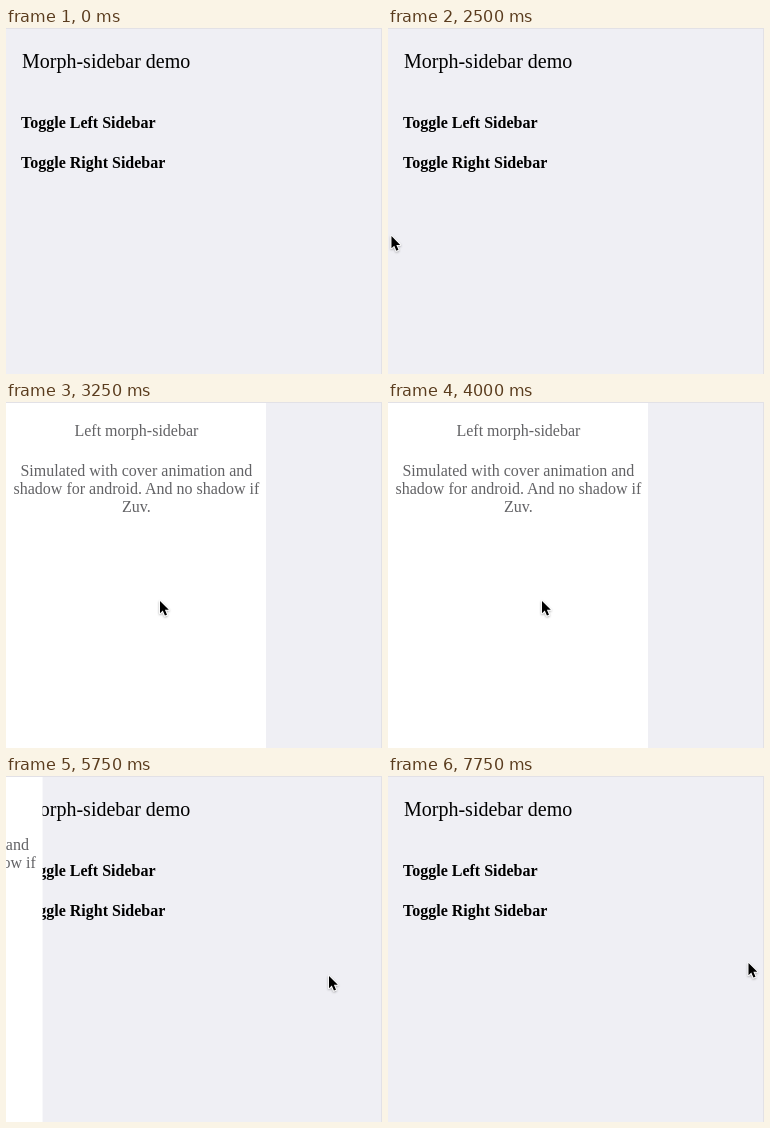
These frames come from a looping animation (376 by 346 pixels, 8000 ms). An HTML page:

```html
<!DOCTYPE html>
<html lang="en">
<head>
<meta charset="utf-8">
<title>Morph-sidebar demo</title>
<style>
  html, body { margin: 0; width: 100%; height: 100%; overflow: hidden; background: #efeff4; }
  svg { display: block; width: 376px; height: 346px; font: 16px "Liberation Serif", serif; }
  .title { font-size: 20px; }
  .link { font-weight: bold; }
  .panel text { fill: #626265; text-anchor: middle; }
</style>
</head>
<body>
<svg viewBox="0 0 376 346">
  <defs>
    <filter id="shadow" x="-50%" y="-50%" width="200%" height="200%">
      <feDropShadow dx="0" dy="1" stdDeviation=".8" flood-opacity=".35"/>
    </filter>
  </defs>
  <rect width="376" height="346" fill="#efeff4"/>
  <text class="title" x="16" y="40">Morph-sidebar demo</text>
  <text class="link" x="15" y="100">Toggle Left Sidebar</text>
  <text class="link" x="15" y="140">Toggle Right Sidebar</text>
  <g class="panel" id="panel">
    <rect width="260" height="346" fill="#fff"/>
    <text x="130.4" y="34">Left morph-sidebar</text>
    <text x="130.4" y="74">Simulated with cover animation and</text>
    <text x="130.4" y="92">shadow for android. And no shadow if</text>
    <text x="130.4" y="110">Zuv.</text>
  </g>
  <path d="M0 .5H376M375.5 0V346" stroke="#e2e1e6" fill="none"/>
  <g id="cursor" filter="url(#shadow)">
    <path d="M1 1V13.2L3.8 10.6L5.9 15.6L8 14.7L5.9 9.8H9.8Z"
      stroke="#fff" stroke-width="1.6" stroke-linejoin="round" paint-order="stroke"/>
  </g>
</svg>
<script>
  const LOOP = 8000, STEP = 250, WIDTH = 260;
  const panel = document.getElementById('panel');
  const cursor = document.getElementById('cursor');

  const linear = p => p;
  const easeIn = p => p ** 3;
  const easeOut = p => 1 - (1 - p) ** 2;
  const smooth = p => p * p * (3 - 2 * p);
  const ramp = (t, from, to) => Math.min(1, Math.max(0, (t - from) / (to - from)));

  // Each move continues from the previous end; sag bends its path downwards.
  const start = { x: 81, y: 169 };
  const moves = [
    { from: 250, to: 750, x: 59, y: 219, ease: easeIn },
    { from: 1250, to: 1500, x: 25.5, y: 209 },
    { from: 1500, to: 2750, x: 1.5, y: 207, ease: easeOut },
    { from: 2750, to: 3000, x: 117, y: 209.5 },
    { from: 3000, to: 3250, x: 153, y: 198 },
    { from: 4000, to: 4750, x: 322, y: 199, ease: smooth, sag: 9 },
    { from: 6000, to: 6750, x: 362, y: 183, sag: -5 },
    { from: 6750, to: 7000, x: 359.5, y: 186 }
  ];

  function pointerAt(t) {
    let { x, y } = start;
    for (const { from, to, x: toX, y: toY, ease = linear, sag = 0 } of moves) {
      const p = ramp(t, from, to);
      const k = ease(p);
      x += (toX - x) * k;
      y += (toY - y) * k + sag * Math.sin(Math.PI * p);
    }
    return [x, y];
  }

  function panelEdge(t) {
    const opened = ramp(t, 2750, 3250) ** 1.19;
    const kept = (1 - ramp(t, 5500, 6000)) ** 2.83;
    return WIDTH * opened * kept;
  }

  const move = (node, x, y) => node.setAttribute('transform', `translate(${x} ${y})`);

  function draw(time) {
    const t = Math.floor(time / STEP) * STEP;
    move(cursor, ...pointerAt(t));
    cursor.setAttribute('visibility', t < STEP ? 'hidden' : 'visible');
    move(panel, panelEdge(t) - WIDTH, 0);
  }

  let began;
  function tick(now) {
    began ??= now;
    draw(Math.max(0, now - began) % LOOP);
    requestAnimationFrame(tick);
  }
  draw(0);
  requestAnimationFrame(tick);
</script>
</body>
</html>
```
